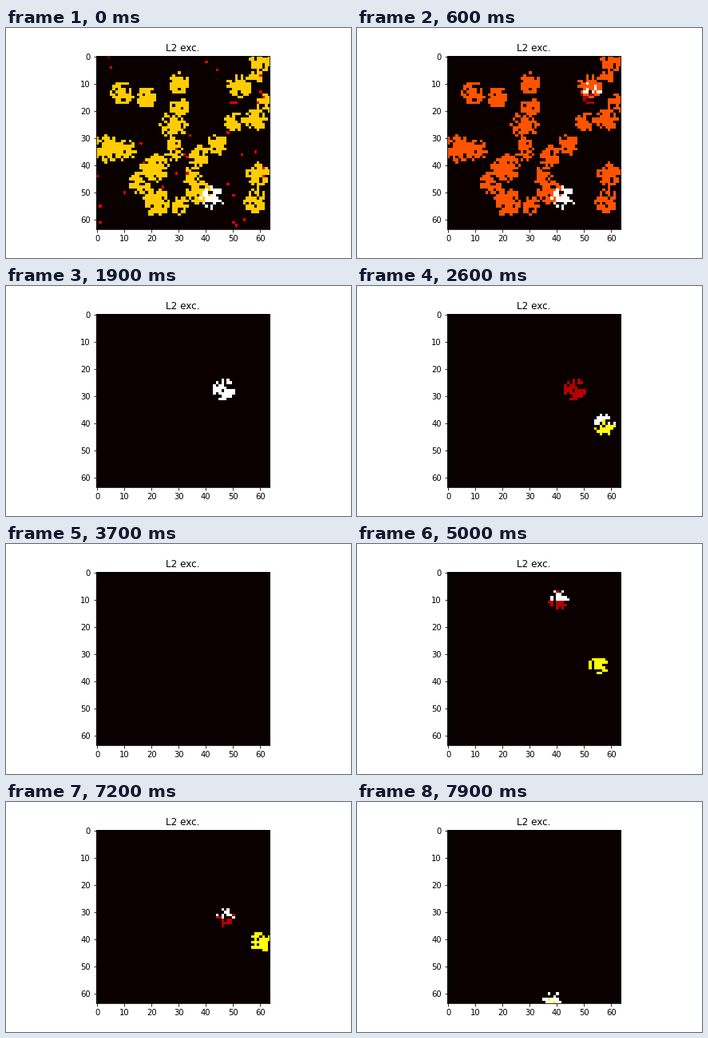
A matplotlib script for the animation above (8000 ms loop, 432x288 px).

```python
import numpy as np
import matplotlib.pyplot as plt
from matplotlib.animation import FuncAnimation

SIZE, FRAMES, STEP_MS = 64, 80, 100
rng = np.random.default_rng(4)
rows, cols = np.mgrid[:SIZE, :SIZE]


def noise():
    return rng.random((SIZE, SIZE))


def cluster(cx, cy, r, core):
    """Random cells in a disc, dense in the middle and ragged at the rim."""
    q = ((cols - cx) ** 2 + (rows - cy) ** 2) / r ** 2
    return (q <= 1) & (noise() < core - 0.5 * q)


# resting activity: centre x, centre y, radius
CROWD = [
    (60, 2, 4.2), (52, 11, 4.6), (58, 8, 2.4), (30, 10, 4), (9, 13.5, 4.4),
    (18, 15, 3.8), (30, 18.5, 3.4), (28, 25, 5), (50, 24, 3.8), (58, 23, 4.3),
    (62, 17, 3.8), (3, 34, 5.2), (10, 34.5, 4.2), (28, 34, 4.2),
    (37, 36.5, 4), (44, 32.5, 4), (21, 41, 5.2), (15.5, 46.5, 4),
    (35, 44, 3.8), (37, 50, 4.6), (21.5, 53.5, 5.2), (30, 54.5, 3.6),
    (59, 43.5, 4.6), (58, 53, 4.3),
]
crowd = np.any([cluster(*c, core=0.95) for c in CROWD], axis=0)
specks = noise() < 0.0095

# centre x, centre y, radius, first frame, first fading frame, fade steps
STIMULI = [
    (42.3, 52, 4.3, -9, 7, 3),
    (52.5, 13.5, 4.3, 6, 14, 4),
    (46.5, 27.5, 4.3, 14, 24, 4),
    (57.2, 40.5, 4, 24, 37, 1),
    (55, 34, 3.8, 40, 50, 4),
    (40.5, 10, 4, 50, 62, 4),
    (40, 7, 0.5, 60, 62, 4),
    (60.3, 41, 4, 62, 72, 4),
    (47, 32, 3.6, 72, 75, 1),
    (38, 63, 3.7, 77, FRAMES, 1),
]


def make_patch(cx, cy, r, on, off, fall):
    mask = cluster(cx, cy, r, core=0.85)
    late = (rows > cy) | (noise() < 0.1)
    return mask & ~late, mask & late, on, off, fall


patches = [make_patch(*s) for s in STIMULI]
spill = cluster(48.5, 26, 2.7, core=0.95)


def ramp(n, start, steps):
    """0 before start, then up to 1 in equal steps."""
    return np.clip((n - start + 1) / steps, 0, 1)


def activity(n):
    """Firing level of every cell, from 0 to 1."""
    fading = np.clip(0.49 - 0.24 * (n - 6), 0, 0.49)
    grid = crowd * (0.67 if n < 6 else fading)
    if n < 6:
        grid = np.where(specks, 0.333, grid)
    elif 14 <= n < 19:
        grid = np.maximum(grid, spill * (0.75 - 0.15 * (n - 14)))
    for early, late, on, off, fall in patches:
        if n >= on:
            decay = 1 - ramp(n, off, fall)
            level = early + late * ramp(n, on, 4)
            grid = np.maximum(grid, level * decay)
    return grid


plt.rcParams.update({"font.family": "DejaVu Sans", "font.size": 10})
fig, ax = plt.subplots(figsize=(6, 4), dpi=72)
fig.subplots_adjust(left=0.125, right=0.9, bottom=0.125, top=0.88)
image = ax.imshow(activity(0), cmap="hot", vmin=0, vmax=1,
                  interpolation="nearest")
ax.set_xticks(range(0, SIZE, 10))
ax.set_yticks(range(0, SIZE, 10))
ax.set_title("L2 exc.")


def update(n):
    image.set_data(activity(n))
    return [image]


anim = FuncAnimation(fig, update, frames=FRAMES, interval=STEP_MS,
                     repeat=True, repeat_delay=0)
plt.show()
```
